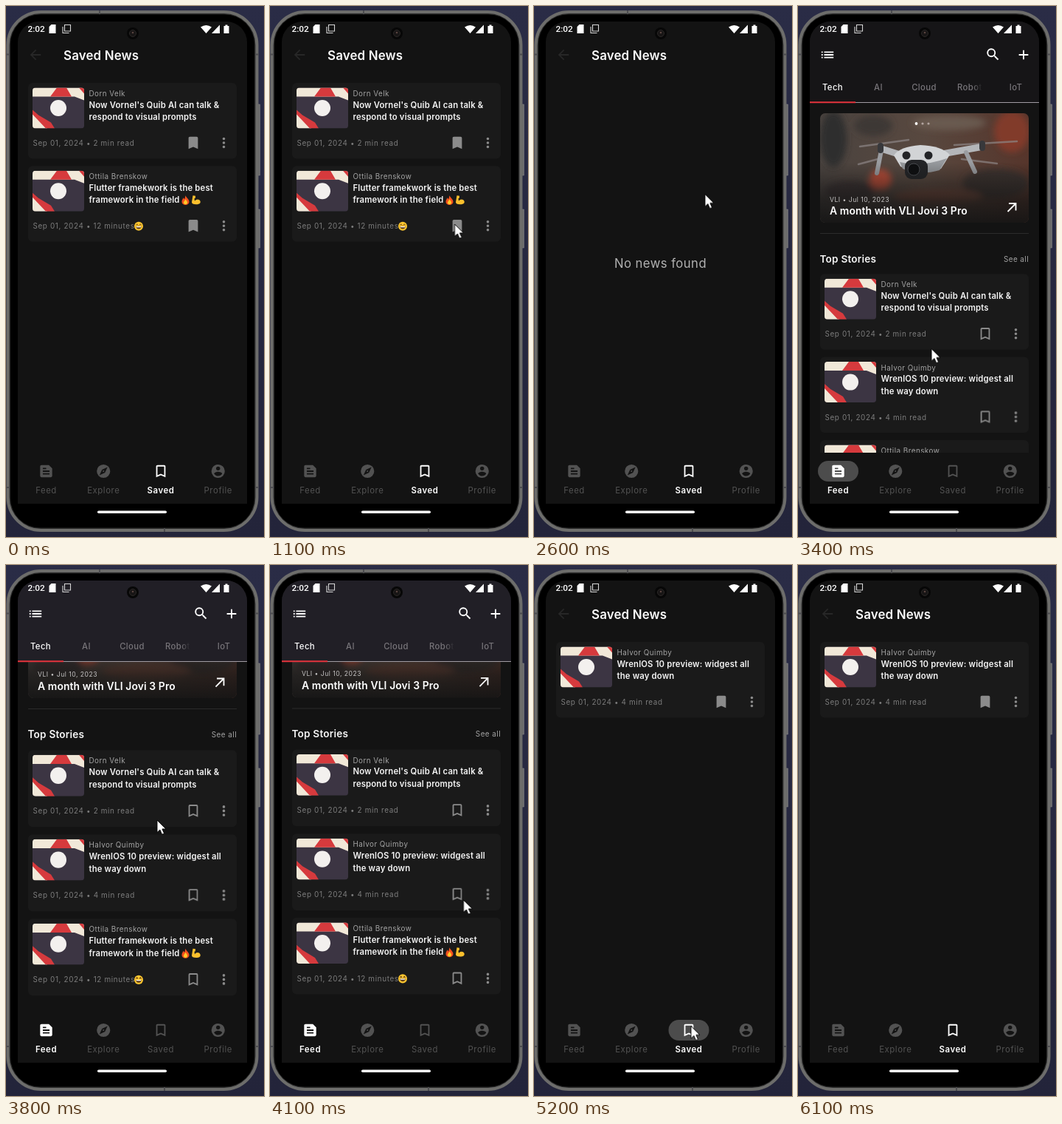
An HTML page that plays this animation: 350x718 px, repeating every 6.5 s.

```html
<!DOCTYPE html>
<html lang="en">
<head>
<meta charset="utf-8">
<title>Saved news</title>
<style>
html, body { margin: 0; width: 100%; height: 100%; overflow: hidden; background: #25263d; }
svg { display: block; width: 100%; height: 100%; }
text { font-family: Inter, sans-serif; }
.h1 { font-size: 16.9px; letter-spacing: .15px; font-weight: 600; fill: #fafafa; }
.h2 { font-size: 13.6px; letter-spacing: .2px; font-weight: 600; fill: #f5f5f5; }
.hero { font-size: 13.9px; letter-spacing: .1px; font-weight: 600; fill: #fff; }
.title { font-size: 11.3px; letter-spacing: .17px; font-weight: 600; fill: #f4f4f4; }
.by { font-size: 9.9px; letter-spacing: .45px; fill: #a3a3a3; }
.date { font-size: 9.9px; letter-spacing: .64px; fill: #7c7c7c; }
.tiny { font-size: 8.6px; letter-spacing: .5px; fill: #c6c4c4; }
.empty { font-size: 16.7px; letter-spacing: .45px; fill: #b2b2b2; text-anchor: middle; }
.tab { font-size: 11.3px; letter-spacing: .4px; font-weight: 500; fill: #777479; text-anchor: middle; }
.nav { fill: #525252; }
.nav text { font-size: 11.4px; letter-spacing: .55px; text-anchor: middle; }
.clock { font: 500 11.8px Roboto, sans-serif; fill: #fff; }
.grey { fill: #8b8b8b; }

/* 1% = 65 ms */
.saved, .feed, .one, .two, .three, .none, .navFeed, .navSaved, .mark, .unmark { animation: 6.5s step-end infinite; }
.saved { animation-name: saved; }
.feed { animation-name: feed; }
.one { animation-name: one; }
.two { animation-name: two; }
.three { animation-name: three; }
.none { animation-name: none-found; }
.navFeed { animation-name: nav-feed; }
.navSaved { animation-name: nav-saved; }
.mark { animation-name: mark; }
.unmark { animation-name: unmark; }
@keyframes saved { 0% { opacity: 1 } 49.1% { opacity: 0 } 76.8%, 100% { opacity: 1 } }
@keyframes feed { 0% { opacity: 0 } 49.1% { opacity: 1 } 76.8%, 100% { opacity: 0 } }
@keyframes one { 0% { opacity: 1 } 39.9%, 100% { opacity: 0 } }
@keyframes two { 0% { opacity: 1 } 19.9%, 100% { opacity: 0 } }
@keyframes three { 0% { opacity: 0 } 76.8%, 100% { opacity: 1 } }
@keyframes none-found { 0% { opacity: 0 } 39.9% { opacity: 1 } 49.1%, 100% { opacity: 0 } }
@keyframes nav-feed {
  0% { fill: #525252; font-weight: 400 } 46.1% { fill: #fff; font-weight: 600 }
  75.3%, 100% { fill: #525252; font-weight: 400 }
}
@keyframes nav-saved {
  0% { fill: #fff; font-weight: 600 } 46.1% { fill: #525252; font-weight: 400 }
  75.3%, 100% { fill: #fff; font-weight: 600 }
}
@keyframes mark { 0% { opacity: 0 } 67.6%, 100% { opacity: 1 } }
@keyframes unmark { 0% { opacity: 1 } 67.6%, 100% { opacity: 0 } }

.pillFeed { animation: pill-feed 6.5s linear infinite; }
.pillSaved { animation: pill-saved 6.5s linear infinite; }
@keyframes pill-feed { 0%, 47.7% { opacity: 0 } 49.2%, 53.8% { opacity: 1 } 57%, 100% { opacity: 0 } }
@keyframes pill-saved { 0%, 76.2% { opacity: 0 } 77.7%, 80.8% { opacity: 1 } 84%, 100% { opacity: 0 } }

.bar { animation: bar 6.5s linear infinite; }
@keyframes bar { 0%, 53.2% { fill: #161517 } 56%, 100% { fill: #211f26 } }

.scroll { animation: scroll 6.5s infinite; }
@keyframes scroll {
  0%, 53% { transform: none; animation-timing-function: ease-in-out }
  59%, 100% { transform: translateY(-108.5px) }
}
.stretch { transform-origin: 0 604px; animation: stretch 6.5s ease-out infinite; }
@keyframes stretch {
  0%, 57% { transform: none } 60% { transform: scaleY(1.022) }
  63.1% { transform: scaleY(1.0125) } 68%, 100% { transform: none }
}

.cursor { animation: cursor 6.5s ease-in-out infinite; }
@keyframes cursor {
  0%, 3% { transform: translate(300px, 724px) }
  7.7% { transform: translate(270px, 490px); animation-timing-function: linear }
  10.8% { transform: translate(253px, 375px); animation-timing-function: ease-out }
  13.8%, 21.6% { transform: translate(250.5px, 295px) }
  32.3% { transform: translate(257px, 212px) }
  36.9%, 38.5% { transform: translate(250px, 186px) }
  40% { transform: translate(232px, 254.5px) }
  46.1%, 48.5% { transform: translate(50px, 627px) }
  52.3% { transform: translate(181px, 463.5px) }
  53.8% { transform: translate(184px, 458px) }
  58.5% { transform: translate(205px, 345px) }
  63.1% { transform: translate(262.5px, 453px) }
  65.4%, 67.6% { transform: translate(254px, 446px) }
  70.8%, 85% { transform: translate(213px, 623.5px) }
  90%, 100% { transform: translate(222px, 724px) }
}
</style>
</head>
<body>
<svg viewBox="0 0 350 718" preserveAspectRatio="none">
  <defs>
    <linearGradient id="bg" x2="0" y2="1">
      <stop stop-color="#2a2c46"/><stop offset="1" stop-color="#23243a"/>
    </linearGradient>
    <linearGradient id="fade" gradientUnits="userSpaceOnUse" x1="237" x2="250">
      <stop stop-color="#777479"/><stop offset="1" stop-color="#777479" stop-opacity="0"/>
    </linearGradient>
    <linearGradient id="photo">
      <stop stop-color="#4a433f"/><stop offset=".5" stop-color="#58483f"/><stop offset="1" stop-color="#56352b"/>
    </linearGradient>
    <linearGradient id="shade" x2="0" y2="1">
      <stop offset=".45" stop-color="#141414" stop-opacity="0"/>
      <stop offset=".8" stop-color="#141414" stop-opacity=".7"/>
      <stop offset="1" stop-color="#141414" stop-opacity=".93"/>
    </linearGradient>
    <filter id="soft" x="-50%" y="-50%" width="200%" height="200%"><feGaussianBlur stdDeviation="4"/></filter>
    <clipPath id="screen"><path d="M16 673V49a28 28 0 0 1 28-28H299a28 28 0 0 1 28 28V673z"/></clipPath>
    <clipPath id="view"><path d="M16 131H327V604H16z"/></clipPath>
    <clipPath id="heroBox"><rect x="30" y="145" width="283" height="148" rx="7"/></clipPath>
    <clipPath id="thumbBox"><rect width="70" height="55" rx="4"/></clipPath>
    <g id="thumb" clip-path="url(#thumbBox)">
      <path fill="#3c3543" d="M0 0H70V55H0z"/>
      <path fill="#f1e8d8" d="M0 0H70V17L57 12H0zM0 34L20 55H0z"/>
      <path fill="#d63a3d" d="M24 12L33 0H46L53 12zM63 0H70V8zM0 30L8 37 25 47 30 55H18L0 36z"/>
      <circle cx="35" cy="27.5" r="11" fill="#f3f0ee"/>
    </g>
    <g id="fire">
      <path fill="#f4511e" d="M0-6C1-3 5-1 5 2.500A5 4.300 0 0 1-5 2.500C-5 0-3.500-1-3-3L-1.500-1C-.500-2.500-.700-4 0-6z"/>
      <path fill="#ffca28" d="M0-1C1 1 2.800 2 2.600 4A2.700 2.700 0 0 1-2.600 4C-2.700 2-.500 1 0-1z"/>
    </g>
    <path id="arm" fill="#fbc02d" d="M-4.500-6L-1-5.500-1.200-2.500-2.500-2-2 1.500C0-1.500 4-1.500 5.500 1.500 6.500 4.500 4 6 0 6-4 6-6 5-6 3z"/>
    <g id="smile">
      <circle r="6" fill="#fcc62f"/>
      <path d="M-3.600 0H3.600A3.600 3.800 0 0 1-3.600 0z" fill="#5d3a16"/>
      <path d="M-3.300.200H3.300L3 1.400H-3z" fill="#fff"/>
      <path d="M-3.600-1.500L-2.300-3-1-1.500M1-1.500L2.300-3 3.600-1.500" fill="none" stroke="#5d3a16"/>
    </g>
  </defs>

  <path fill="url(#bg)" d="M0 0H350V718H0z"/>
  <path fill="#6b6b6b" stroke="#7c7c7e" stroke-width=".7" d="M341 133h3.500v96h-3.500zM341 275h3.500v52h-3.500z"/>
  <rect x="2.500" y="8" width="338" height="701" rx="45" fill="#2b2b2b" stroke="#6d6d6b" stroke-width="4"/>
  <path stroke="#4d4d50" stroke-width="2" d="M0 65.500H5M0 651H5M338 65.500H343M338 651H343M127 6V11M215 706V711"/>
  <rect x="6" y="11.500" width="331" height="694" rx="40" fill="#000"/>

  <g clip-path="url(#screen)">
    <path fill="#131313" d="M16 21H327V673H16z"/>
    <g class="saved" id="savedPage"></g>
    <g class="feed" id="feedPage"></g>
    <g id="tabs"></g>
  </g>

  <text class="clock" x="29.500" y="35">2:02</text>
  <g fill="#fff">
    <path d="M61.500 25H67.500V37H58.500V28z"/>
    <path d="M264 28.500Q271.500 23.500 279 28.500L271.500 37zM290 25.500V37H279zM295.500 27H297.500V25.500H300.500V27H302.500V37H295.500z"/>
    <path fill="none" stroke="#d5d5d5" stroke-width="1.100" d="M79.500 25.500H87.500V34H79.500zM77 28V36.500H85.500"/>
  </g>
  <circle cx="172" cy="37" r="8" fill="#070707"/>
  <circle cx="172" cy="37" r="4.500" fill="#171515" stroke="#2b2827"/>
  <circle cx="172" cy="36" r="1.300" fill="#57443f"/>
  <rect x="124" y="682.500" width="94" height="3.600" rx="1.800" fill="#fff"/>
  <g class="cursor">
    <path d="M0 0V16.500L3.900 13 6.600 19.200 9.600 17.900 6.900 11.900H12z" fill="#fff" stroke="#000" stroke-width=".9"/>
  </g>
</svg>
<script>
const paths = {
  mark: 'M17 3H7c-1.100 0-2 .900-2 2v16l7-3 7 3V5c0-1.100-.900-2-2-2z',
  outline: 'M17 3H7c-1.100 0-2 .900-2 2v16l7-3 7 3V5c0-1.100-.900-2-2-2zm0 15l-5-2.180L7 18V5h10v13z',
  explore: 'M12 10.900a1.100 1.100 0 1 0 0 2.200 1.100 1.100 0 0 0 0-2.200zM12 2a10 10 0 1 0 0 20 10 10 0 0 0 0-20zm2.190 12.190L6 18l3.810-8.190L18 6z',
  person: 'M12 2a10 10 0 1 0 0 20 10 10 0 0 0 0-20zm0 3a3 3 0 1 1 0 6 3 3 0 0 1 0-6zm0 14.200c-2.500 0-4.710-1.280-6-3.220.030-1.990 4-3.080 6-3.080s5.970 1.090 6 3.080c-1.290 1.940-3.500 3.220-6 3.220z',
  feed: 'M16 3H5c-1.100 0-2 .900-2 2v14c0 1.100.900 2 2 2h14c1.100 0 2-.900 2-2V8zM7 7h5v2H7zm10 10H7v-2h10zm0-4H7v-2h10z',
  list: 'M3 13h2v-2H3zm0 4h2v-2H3zm0-8h2V7H3zm4 4h14v-2H7zm0 4h14v-2H7zM7 7v2h14V7z',
  search: 'M15.500 14h-.790l-.280-.270A6.500 6.500 0 1 0 13.730 14.430l.270.280v.790l5 4.990L20.490 19zm-6 0a4.500 4.500 0 1 1 0-9 4.500 4.500 0 0 1 0 9z',
  plus: 'M19 13h-6v6h-2v-6H5v-2h6V5h2v6h6z',
  back: 'M20 11H7.830l5.590-5.590L12 4l-8 8 8 8 1.410-1.410L7.830 13H20z',
  more: 'M12 4a2 2 0 1 0 0 4 2 2 0 0 0 0-4zm0 6a2 2 0 1 0 0 4 2 2 0 0 0 0-4zm0 6a2 2 0 1 0 0 4 2 2 0 0 0 0-4z'
};
const icon = (name, x, y, attrs = '') =>
  `<path ${attrs} fill-rule="evenodd" transform="translate(${x} ${y}) scale(.91) translate(-12 -12)" d="${paths[name]}"/>`;
const text = (cls, x, y, str, attrs = '') => `<text class="${cls}" x="${x}" y="${y}" ${attrs}>${str}</text>`;
const use = (id, x, y) => `<use href="#${id}" x="${x}" y="${y}"/>`;
const grey = 'class="grey"';

const stories = {
  talk: { by: 'Dorn Velk', lines: ["Now Vornel's Quib AI can talk &amp;", 'respond to visual prompts'], read: '2 min read' },
  watch: { by: 'Halvor Quimby', lines: ['WrenlOS 10 preview: widgest all', 'the way down'], read: '4 min read' },
  flutter: {
    by: 'Ottila Brenskow', lines: ['Flutter framekwork is the best', 'framework in the field'], read: '12 minutes',
    extra: use('fire', 243.5, 46) + use('arm', 258, 46) + use('smile', 180, 81.5)
  }
};

function card(story, y, marks, cls = '') {
  const { by, lines, read, extra = '' } = stories[story];
  return `<g class="${cls}"><g transform="translate(0 ${y})">
    <rect x="30" width="283" height="102.500" rx="6" fill="#1a1a1a"/>
    ${use('thumb', 36, 6.5)}
    ${text('by', 112.5, 18, by)}
    ${text('title', 112.5, 33.5, lines[0])}
    ${text('title', 112.5, 50, lines[1])}
    ${text('date', 36.5, 85, 'Sep 01, 2024 • ' + read)}
    ${marks}${icon('more', 295.5, 81, grey)}${extra}
  </g></g>`;
}
const filled = icon('mark', 254, 81, grey);
const hollow = icon('outline', 254, 81, grey);
const toggled = `<g class="unmark">${hollow}</g><g class="mark">${filled}</g>`;

savedPage.innerHTML =
  icon('back', 40, 66, 'fill="#272727"') +
  text('h1', 78, 72.5, 'Saved News') +
  card('talk', 104, filled, 'one') +
  card('flutter', 216.3, filled, 'two') +
  card('watch', 104, filled, 'three') +
  `<g class="none">${text('empty', 171.5, 354, 'No news found')}</g>`;

const drone = `
  <g stroke-linecap="round" fill="none">
    <path stroke="#8d8786" stroke-width="2.500" opacity=".7" d="M84 190L150 181M82 214L112 206M212 188L297 183M222 207L270 213"/>
    <path stroke="#b4b6b9" stroke-width="9" d="M145 203L113 193M190 201L246 191"/>
    <path stroke="#9a9ca0" stroke-width="6" d="M113 195L107 226M228 198L240 224"/>
    <path stroke="#37383b" stroke-width="8" d="M112 189V195M250 186V192"/>
  </g>
  <path fill="#d2d4d6" d="M130 202Q138 190 166 188 194 189 206 201L194 220Q164 230 139 217z"/>
  <path fill="#96999d" d="M138 211Q168 218 202 206L192 222Q164 230 142 220z"/>
  <g fill="#232427">
    <circle cx="147" cy="202" r="5.500"/><circle cx="177" cy="202" r="5.500"/>
    <rect x="145" y="208" width="31" height="26" rx="9"/>
  </g>
  <circle cx="157" cy="221" r="8" fill="#0d0e10" stroke="#4b4d52"/>`;
const hero = `
  <g clip-path="url(#heroBox)">
    <path fill="url(#photo)" d="M30 145H313V293H30z"/>
    <g filter="url(#soft)">
      <ellipse cx="48" cy="180" rx="18" ry="38" fill="#2f2e2d"/>
      <ellipse cx="102" cy="162" rx="26" ry="14" fill="#3d3835"/>
      <ellipse cx="205" cy="158" rx="50" ry="10" fill="#695a50"/>
      <ellipse cx="290" cy="170" rx="24" ry="28" fill="#813a2c"/>
      <ellipse cx="268" cy="240" rx="45" ry="20" fill="#3b302d"/>
      <ellipse cx="70" cy="250" rx="34" ry="14" fill="#3a3330"/>
      <ellipse cx="112" cy="235" rx="15" ry="14" fill="#bd4d38"/>
      <ellipse cx="190" cy="258" rx="60" ry="10" fill="#74493a"/>
    </g>
    ${drone}
    <path fill="url(#shade)" d="M30 145H313V293H30z"/>
  </g>
  <circle cx="160.500" cy="159" r="1.900" fill="#fff"/>
  <g fill="#b3a5a0"><circle cx="169" cy="159" r="1.600"/><circle cx="177" cy="159" r="1.600"/></g>
  ${text('tiny', 43, 264.5, 'VLI • Jul 10, 2023')}
  ${text('hero', 43, 282, 'A month with VLI Jovi 3 Pro')}
  <path d="M284.500 278L295 267.500M286 267H295.500V276.500" fill="none" stroke="#fff" stroke-width="1.800"/>`;

feedPage.innerHTML = `
  <path fill="#131313" d="M16 21H327V673H16z"/>
  <g clip-path="url(#view)"><g class="stretch"><g class="scroll">
    ${hero}
    <path d="M30 307.500H313" stroke="#2b2b2b"/>
    ${text('h2', 29.5, 346.5, 'Top Stories')}
    ${text('by', 313, 345.5, 'See all', 'text-anchor="end"')}
    ${card('talk', 362.3, hollow)}
    ${card('watch', 474.6, toggled)}
    ${card('flutter', 586.9, hollow)}
  </g></g></g>
  <path class="bar" d="M16 21H327V131H16z"/>
  <g fill="#fff">${icon('list', 40, 66)}${icon('search', 264.5, 65.5)}${icon('plus', 306, 66)}</g>
  ${text('tab', 47, 114, 'Tech', 'style="fill:#fff"')}
  ${text('tab', 109, 114, 'AI')}
  ${text('tab', 171, 114, 'Cloud')}
  ${text('tab', 216, 114, 'Robotics', 'style="fill:url(#fade);text-anchor:start"')}
  ${text('tab', 295.5, 114, 'IoT')}
  <path d="M16 130.500H327" stroke="#a09ba2"/>
  <path d="M16 130.300H78" stroke="#e5343d" stroke-width="2"/>`;

const pill = (x, cls) => `<rect class="${cls}" x="${x - 27.5}" y="615" width="55" height="28" rx="14" fill="#4c4c4c"/>`;
const nav = [['Feed', 'feed', 'navFeed'], ['Explore', 'explore', ''], ['Saved', 'outline', 'navSaved'], ['Profile', 'person', '']];
tabs.innerHTML = pill(54.5, 'pillFeed') + pill(210, 'pillSaved') + nav.map(([label, name, cls], i) => {
  const x = 54.5 + i * 77.75;
  return `<g class="nav ${cls}">${icon(name, x, 629)}${text('', x, 659, label)}</g>`;
}).join('');
</script>
</body>
</html>
```
